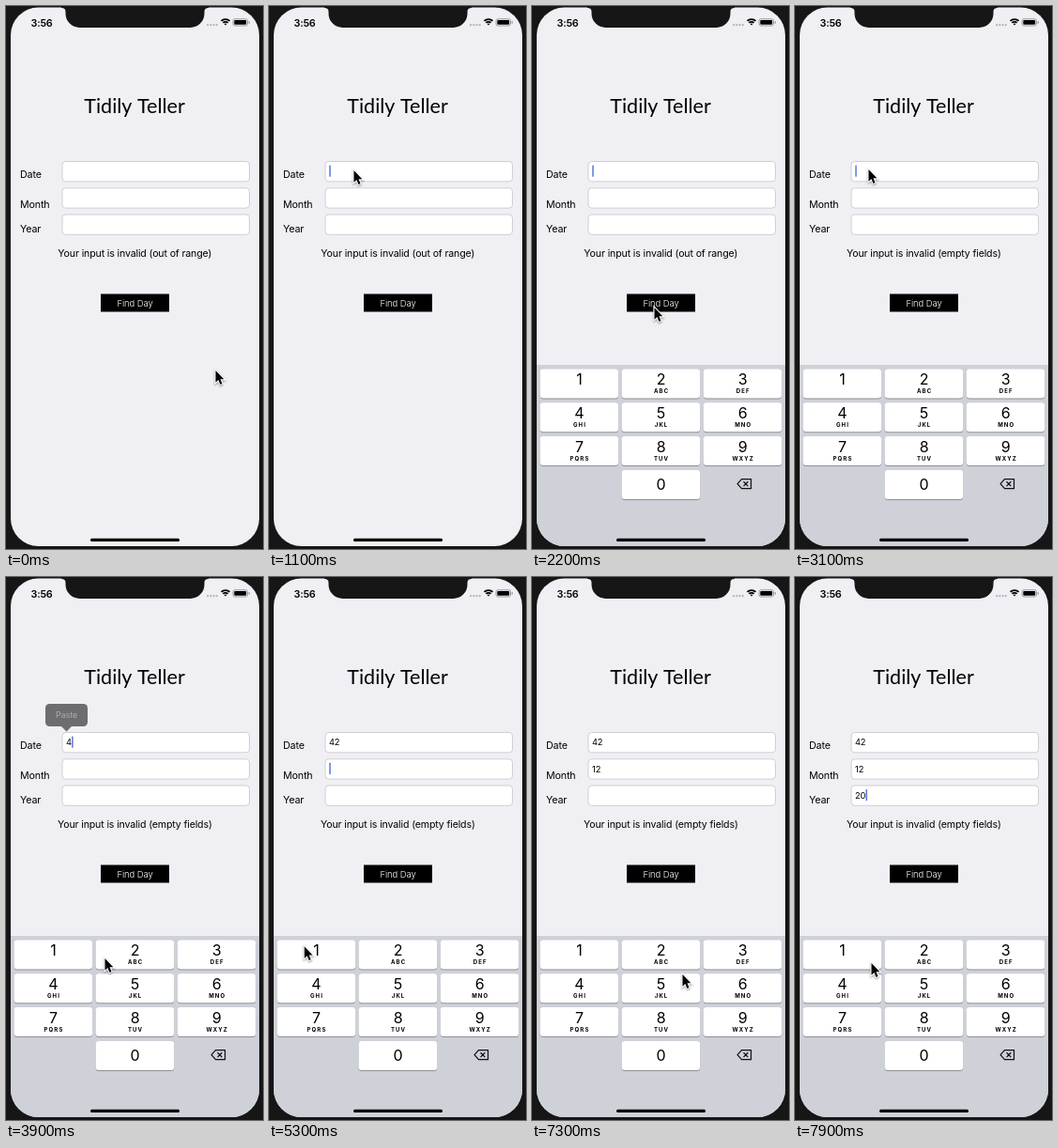
Recreate the animation shown at these times as an HTML page with a canvas. Size 274 by 578 pixels, loop 8000 ms.

```html
<!DOCTYPE html>
<html lang="en">
<head>
<meta charset="utf-8">
<title>Weekday form</title>
<style>
  html, body { margin: 0; width: 100%; height: 100%; overflow: hidden; background: #161617; }
  canvas { display: block; width: 274px; height: 578px; }
</style>
</head>
<body>
<canvas id="stage"></canvas>
<script>
const W = 274, H = 578, LOOP = 8000, STEP = 100;
const BEZEL = '#161617';
const canvas = document.getElementById('stage');
const ctx = canvas.getContext('2d');
const ratio = window.devicePixelRatio || 1;
canvas.width = W * ratio;
canvas.height = H * ratio;

// Pointer stops: time, x, y
const pointerStops = [
  [100, 223, 387], [800, 90, 174], [1500, 90, 174], [2100, 130, 320], [2400, 130, 320],
  [2800, 78, 173], [3300, 78, 173], [3600, 52, 435], [3800, 56, 432], [3900, 105, 405],
  [4100, 133, 402], [4300, 133, 402], [4600, 78, 207], [4800, 78, 207], [5200, 37, 391],
  [5700, 39, 402], [5900, 110, 402], [6100, 110, 402], [6400, 89, 237], [6700, 89, 237],
  [7300, 160, 422], [7400, 145, 405], [7600, 130, 511], [7700, 130, 511], [7900, 81, 410]
];

// Time, field, content; each one restarts the caret blink
const edits = [
  [1100, 0, ''], [2900, 0, ''], [3700, 0, '4'], [4200, 0, '42'], [4800, 1, ''],
  [5600, 1, '1'], [6000, 1, '12'], [6600, 2, ''], [7400, 2, '2'], [7800, 2, '20']
];

// Time, key
const presses = [[3700, '4'], [4200, '2'], [5600, '1'], [6000, '2'], [7400, '2'], [7600, '0'], [7700, '0']];

const fieldTops = [165.5, 193.8, 222];
const keyLetters = ['', 'ABC', 'DEF', 'GHI', 'JKL', 'MNO', 'PQRS', 'TUV', 'WXYZ'];
const clamp = v => Math.max(0, Math.min(1, v));
const smooth = p => p * p * (3 - 2 * p);

function box(x, y, w, h, r, fill, stroke) {
  ctx.beginPath();
  ctx.roundRect(x, y, w, h, r);
  if (fill) { ctx.fillStyle = fill; ctx.fill(); }
  if (stroke) { ctx.strokeStyle = stroke; ctx.lineWidth = 1; ctx.stroke(); }
}

function text(str, x, y, size, { color = '#000', weight = 400, align = 'left', spacing = -0.14, family = 'Inter' } = {}) {
  ctx.font = `${weight} ${size}px ${family}, sans-serif`;
  ctx.letterSpacing = spacing + 'px';
  ctx.textAlign = align;
  ctx.fillStyle = color;
  ctx.fillText(str, x, y);
}

function drawStatusBar() {
  text('3:56', 26.5, 21.5, 10.8, { weight: 600, spacing: -0.2 });
  for (let i = 0; i < 4; i++) box(214 + i * 3.2, 19, 2.2, 2.2, 1, '#b4b4ba');
  ctx.strokeStyle = '#000';
  ctx.lineWidth = 1.8;
  for (const r of [1, 3.7, 6.4]) {
    ctx.beginPath();
    ctx.arc(234, 20.5, r, -Math.PI * 0.75, -Math.PI * 0.25);
    ctx.stroke();
  }
  box(242, 13.8, 15.5, 7.2, 2, null, '#9a9a9e');
  box(243.3, 15.1, 12.9, 4.6, 1, '#000');
  box(258.6, 15.9, 1.2, 3, 0.6, '#9a9a9e');
}

function drawForm(t) {
  text('Tidily Teller', 137, 114, 21.5, { align: 'center', spacing: 0, family: 'Lato' });
  text('Date', 15, 182.5, 10.7);
  text('Month', 15, 215, 10.7);
  text('Year', 15, 241, 10.7);
  for (const y of fieldTops) box(60, y, 199.5, 21.3, 3.5, '#fff', '#d0d0d4');

  const done = edits.filter(e => e[0] <= t);
  const values = ['', '', ''];
  for (const [, field, value] of done) values[field] = value;
  values.forEach((v, i) => text(v, 64, fieldTops[i] + 13.9, 9.3));

  if (done.length) {
    const [start, field, value] = done[done.length - 1];
    if ((t - start) % 1000 < 600) {
      const x = 64.3 + (value ? ctx.measureText(value).width : 0);
      box(x, fieldTops[field] + 4, 1.4, 12.2, 0.5, '#4a6fdc');
    }
  }

  const reason = t < 2300 ? 'out of range' : 'empty fields';
  text(`Your input is invalid (${reason})`, 137.3, 266.5, 10.6, { align: 'center' });
  box(101, 306.5, 73, 19, 0, '#000');
  text('Find Day', 137.5, 319.7, 9.5, { color: '#fff', weight: 300, align: 'center', spacing: -0.1 });
}

function drawPopup(t) {
  const alpha = t > 3800 ? clamp(0.62 - (t - 3900) / 160) : clamp((t - 3150) / 150);
  if (!alpha) return;
  ctx.globalAlpha = alpha;
  box(42, 135, 45, 24, 4.5, '#1e1e20');
  ctx.beginPath();
  ctx.moveTo(59, 159);
  ctx.lineTo(64.5, 164.5);
  ctx.lineTo(70, 159);
  ctx.fill();
  text('Paste', 64.5, 150, 8.8, { color: '#d4d4d4', align: 'center', spacing: 0 });
  ctx.globalAlpha = 1;
}

function drawKey(label, col, row, pressed) {
  const x = 8.5 + col * 87.1, y = 386.5 + row * 35.8, mid = x + 42;
  box(x, y + 1, 83.6, 31, 3.5, '#8d9096');
  box(x, y, 83.6, 31, 3.5, pressed ? '#b3b8c2' : '#fff');
  text(label, mid, y + (label === '0' ? 20.6 : 16.4), 16, { align: 'center', spacing: 0 });
  const letters = keyLetters[label - 1];
  if (letters) text(letters, mid + 0.5, y + 25.7, 6, { weight: 700, align: 'center', spacing: 1.1 });
}

function drawKeyboard(t) {
  if (t < 1100) return;
  const s = (t - 1100) / 1000 * 24.7;
  ctx.save();
  ctx.translate(0, 193 * (1 + s) * Math.exp(-s));
  box(5, 382, 265, 200, 0, '#ced1d8');
  const held = presses.find(p => p[0] === t);
  for (let n = 1; n <= 10; n++) {
    const label = String(n % 10);
    const col = n === 10 ? 1 : (n - 1) % 3;
    drawKey(label, col, Math.floor((n - 1) / 3), held && held[1] === label);
  }
  ctx.strokeStyle = '#111';
  ctx.lineWidth = 1.25;
  ctx.lineJoin = 'round';
  ctx.stroke(new Path2D('M219 508.7L223.5 503.7H233.5V513.7H223.5ZM225.5 506.3l4.8 4.8m0-4.8l-4.8 4.8'));
  ctx.restore();
}

function drawNotch() {
  ctx.fillStyle = BEZEL;
  ctx.beginPath();
  ctx.moveTo(59, 0);
  ctx.lineTo(59, 2);
  ctx.quadraticCurveTo(63.5, 2, 63.5, 6);
  ctx.arcTo(63.5, 23, 80, 23, 15);
  ctx.arcTo(211.5, 23, 211.5, 8, 15);
  ctx.lineTo(211.5, 6);
  ctx.quadraticCurveTo(211.5, 2, 216, 2);
  ctx.lineTo(216, 0);
  ctx.fill();
}

function pointerAt(t) {
  const next = pointerStops.findIndex(p => p[0] > t);
  if (next === 0) return pointerStops[0].slice(1);
  if (next < 0) return pointerStops[pointerStops.length - 1].slice(1);
  const [t0, x0, y0] = pointerStops[next - 1], [t1, x1, y1] = pointerStops[next];
  const p = smooth((t - t0) / (t1 - t0));
  return [x0 + (x1 - x0) * p, y0 + (y1 - y0) * p];
}

const arrow = new Path2D('M.5 1V13.8L3.4 11.1L5.4 15.9L7.5 15L5.5 10.3H9.3Z');
function drawPointer(t) {
  ctx.save();
  ctx.translate(...pointerAt(t));
  ctx.shadowColor = 'rgba(0,0,0,.4)';
  ctx.shadowBlur = 2 * ratio;
  ctx.shadowOffsetY = ratio;
  ctx.strokeStyle = '#fff';
  ctx.lineWidth = 2.2;
  ctx.stroke(arrow);
  ctx.shadowColor = 'transparent';
  ctx.fillStyle = '#000';
  ctx.fill(arrow);
  ctx.restore();
}

function draw(t) {
  ctx.setTransform(ratio, 0, 0, ratio, 0, 0);
  box(0, 0, W, H, 0, BEZEL);
  ctx.save();
  box(5, 1.5, 265, 573.5, 29.5, '#efeff4');
  ctx.clip();
  drawStatusBar();
  drawForm(t);
  drawPopup(t);
  drawKeyboard(t);
  box(90, 566.8, 95, 3.1, 1.5, '#000');
  ctx.restore();
  drawNotch();
  drawPointer(t);
}

function tick() {
  const t = performance.now() % LOOP;
  draw(Math.floor(t / STEP) * STEP);
  requestAnimationFrame(tick);
}
tick();
</script>
</body>
</html>
```
